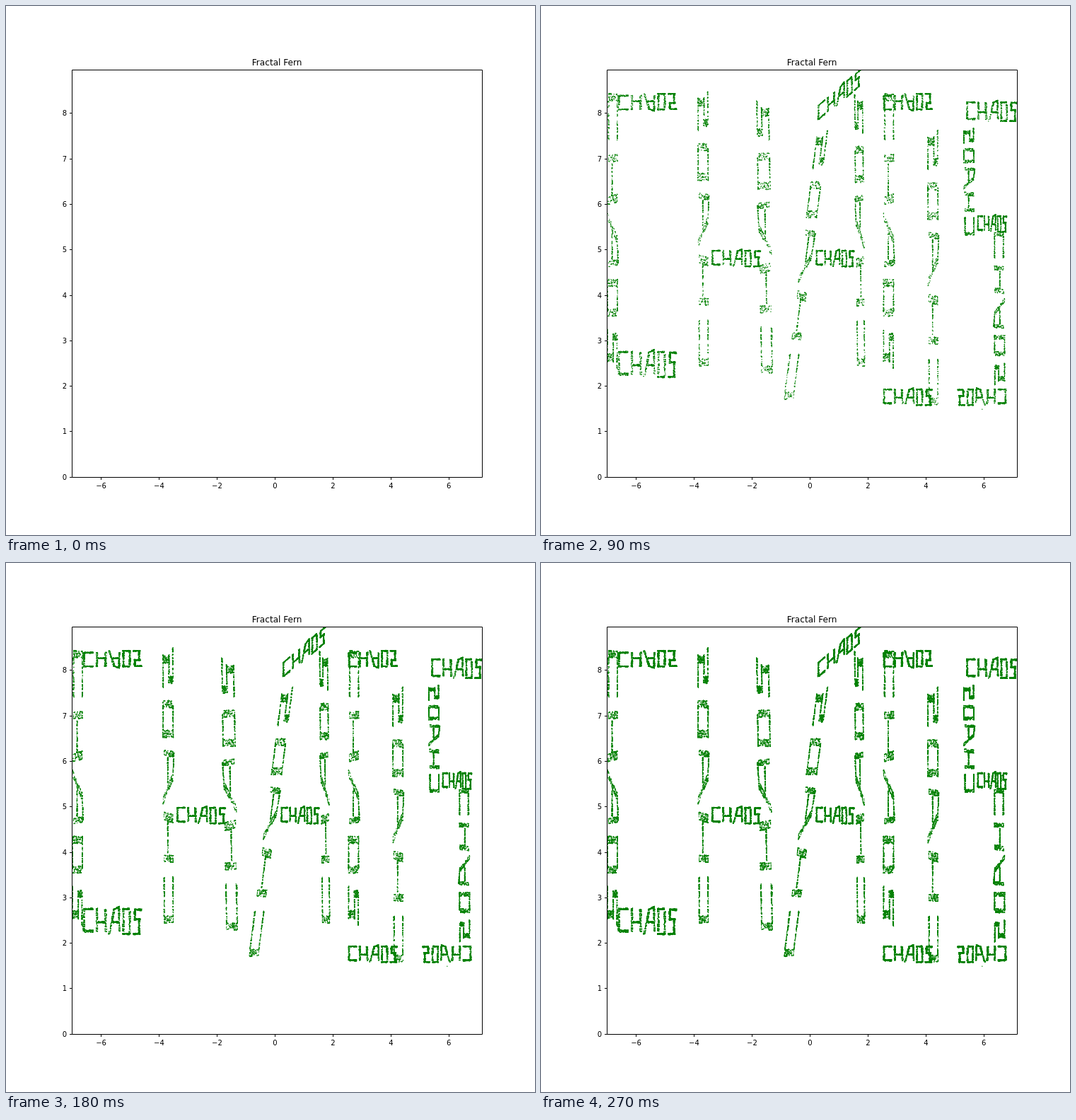
An HTML page with a canvas for the animation above (300 ms loop, 748 px wide and 748 px high).

```html
<!DOCTYPE html>
<html lang="en">
<head>
<meta charset="utf-8">
<title>Fractal Fern</title>
<style>
  html, body { margin: 0; width: 748px; height: 748px; overflow: hidden; background: #fff; }
  canvas, svg { position: absolute; left: 0; top: 0; }
  text { font: 10px "DejaVu Sans", sans-serif; text-anchor: middle; }
  .title { font-size: 12.1px; }
  .left { text-anchor: end; }
  path { fill: none; stroke: #000; stroke-width: 1; }
</style>
</head>
<body>
<canvas id="plot" width="748" height="748"></canvas>
<svg id="axes" width="748" height="748"></svg>
<script>
const STEP_MS = 30, STEPS = 10, POINTS_PER_STEP = 8000, DOT_RADIUS = 0.68;
const HALF_WIDTH = 7, MIDDLE = 5, THICKNESS = 0.053;
const toX = x => 380.4 + 40.98 * x;
const toY = y => 665.72 - 64.3 * y;

// Each stroke of the word is a shrunken copy of the whole word, laid from
// (x1, y1) to (x2, y2); heights count from the middle line.
// A negative weight flips the copy across its stroke.
function stroke(x1, y1, x2, y2, weight = 1) {
  const dx = (x2 - x1) / 2, dy = (y2 - y1) / 2;
  const steep = Math.abs(dy) > Math.abs(dx);
  const across = THICKNESS * weight;
  return (x, y) => {
    const u = x / HALF_WIDTH, v = (y - MIDDLE) * across;
    return [
      (x1 + x2) / 2 + dx * u + (steep ? v : 0),
      MIDDLE + (y1 + y2) / 2 + dy * u + (steep ? 0 : v)
    ];
  };
}
const column = (x, from, to, weight) => stroke(x, from, x, to, weight);
const bar = (y, from, to, weight) => stroke(from, y, to, y, weight);

const CAP = 3.25, LONG = 3.43, SHORT = 2.57, WAIST = -0.2;
const letterC = [
  column(-6.82, LONG, -SHORT),
  bar(CAP, -6.62, -4.62, -1),
  bar(-2.53, -6.62, -4.62, 1.6)
];
const letterH = [
  column(-3.69, -SHORT, LONG),
  bar(WAIST, -3.39, -1.72),
  stroke(-1.46, -2.72, -1.64, 3.21, -1.2)
];
const letterA = [
  stroke(-0.76, -3.3, 0.43, SHORT),
  stroke(0.27, 2.98, 1.73, 3.78),
  stroke(1.78, -SHORT, 1.67, 3.36, -0.8),
  bar(WAIST, 0.21, 1.51)
];
const letterO = [
  column(2.71, LONG, -SHORT),
  bar(CAP, 2.53, 4.2, -1),
  bar(-CAP, 2.53, 4.2),
  column(4.24, -LONG, SHORT)
];
const letterS = [
  bar(3.03, 5.4, 7.13, 1.2),
  column(5.48, 0.31, 2.65),
  bar(0.56, 5.78, 6.78),
  column(6.54, 0.38, -2.95, -1),
  bar(-CAP, 6.77, 5.11)
];
const strokes = [...letterC, ...letterH, ...letterA, ...letterO, ...letterS];

let seed = 12345;
function random() {
  seed = (seed + 0x6D2B79F5) | 0;
  let t = Math.imul(seed ^ seed >>> 15, 1 | seed);
  t = t + Math.imul(t ^ t >>> 7, 61 | t) ^ t;
  return ((t ^ t >>> 14) >>> 0) / 4294967296;
}

// Chaos game: every layer adds more points to the one before it.
function makeLayers() {
  const layers = [];
  let point = strokes.at(-1)(0, 0);
  for (let step = 0; step < STEPS; step++) {
    const layer = document.createElement('canvas');
    layer.width = layer.height = 748;
    const ctx = layer.getContext('2d');
    if (step) {
      ctx.drawImage(layers[step - 1], 0, 0);
      ctx.rect(94, 90, 579, 576);
      ctx.clip();
      ctx.fillStyle = 'green';
      for (let i = 0; i < POINTS_PER_STEP; i++) {
        ctx.beginPath();
        ctx.arc(toX(point[0]), toY(point[1]), DOT_RADIUS, 0, 2 * Math.PI);
        ctx.fill();
        point = strokes[Math.floor(random() * strokes.length)](...point);
      }
    }
    layers.push(layer);
  }
  return layers;
}

function drawAxes() {
  const snap = v => Math.floor(v) + .5;
  let lines = 'M93.5 90.5H673.5V666.5H93.5Z';
  let labels = '<text class="title" x="383.1" y="83.7">Fractal Fern</text>';
  for (let x = -6; x <= 6; x += 2) {
    lines += `M${snap(toX(x))} 666.5v3.5`;
    labels += `<text x="${toX(x)}" y="681.5">${String(x).replace('-', '\u2212')}</text>`;
  }
  for (let y = 0; y <= 8; y++) {
    lines += `M93.5 ${snap(toY(y) + .5)}h-3.5`;
    labels += `<text class="left" x="86.2" y="${toY(y) + 4}">${y}</text>`;
  }
  document.getElementById('axes').innerHTML = `<path d="${lines}"/>${labels}`;
}

drawAxes();
const layers = makeLayers();
const plot = document.getElementById('plot').getContext('2d');
const start = performance.now();

function render() {
  const step = Math.floor((performance.now() - start) / STEP_MS) % STEPS;
  plot.clearRect(0, 0, 748, 748);
  plot.drawImage(layers[step], 0, 0);
  requestAnimationFrame(render);
}
render();
</script>
</body>
</html>
```
